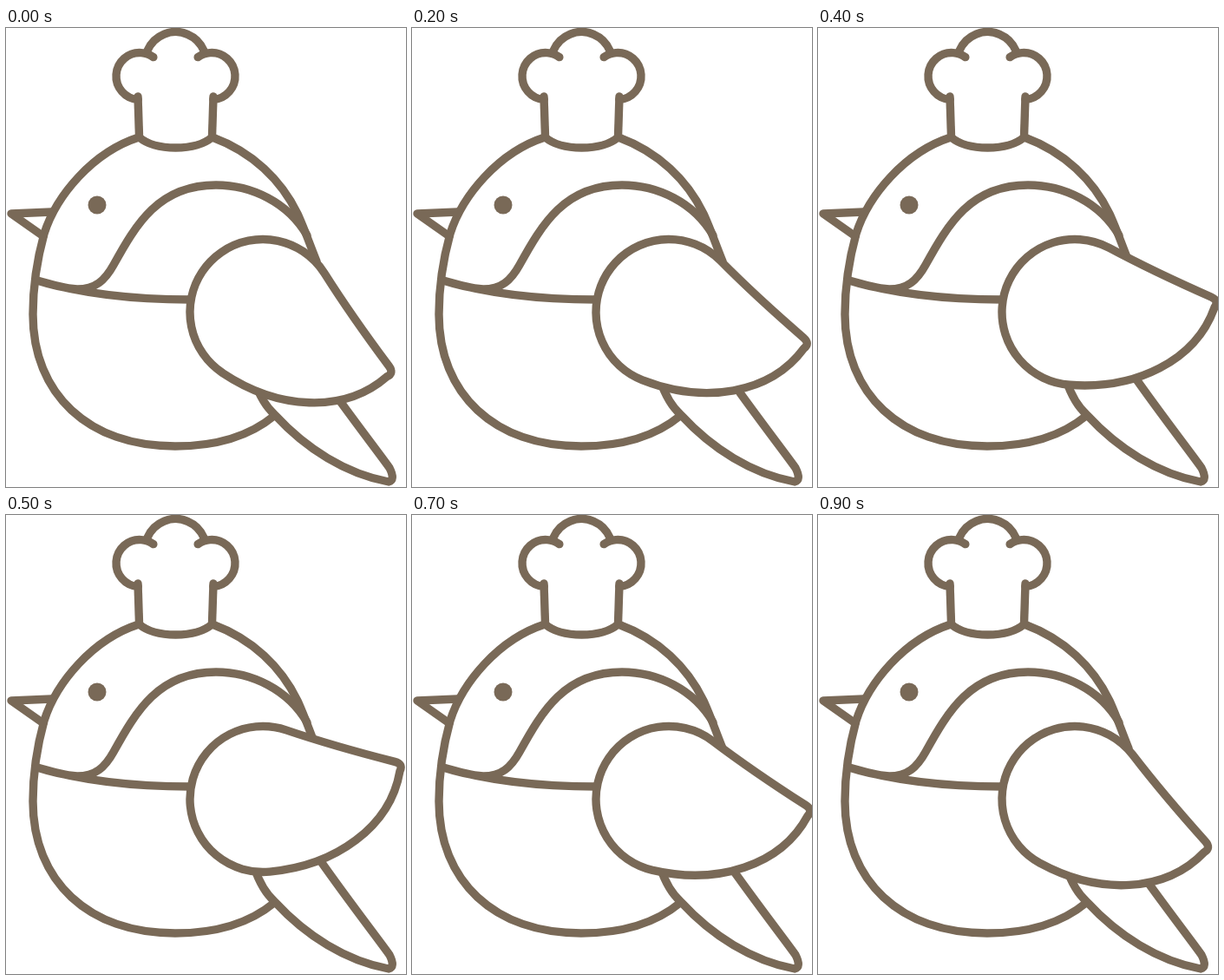
Animation of 461x529 px, one loop 1000 ms. Source, as an HTML page with a canvas:

```html
<!DOCTYPE html>
<html lang="en">
<head>
<meta charset="utf-8">
<title>Chef bird</title>
<style>
  html, body { margin: 0; width: 100%; height: 100%; overflow: hidden; background: #fff; }
  canvas { display: block; }
</style>
</head>
<body>
<canvas id="stage" width="461" height="529"></canvas>
<script>
const ctx = document.getElementById('stage').getContext('2d');
const W = 461, H = 529;
const INK = '#796957', PAPER = '#fff';
const LOOP = 1000, STEP = 100, HALF = 5;
const rad = deg => deg * Math.PI / 180;

const body = new Path2D(
  'M153 126C100 143 58 193 44 237C36 266 31 300 31 330C31 422 95 482 195 482C240 482 280 471 309 447' +
  'M238 126C284 143 317 175 336 214C343 229 350 249 358 269');
const beak = new Path2D('M53 212L6 214L43 240');
const scarf = new Path2D(
  'M36 291C55 297 68 300 82 301C103 301 114 291 124 273C150 226 176 181 242 181C283 181 325 201 347 239' +
  'M36 291C90 307 150 313 212 313');
const tail = new Path2D(
  'M286 406C292 424 300 437 310 446C346 485 392 514 441 523Q449 521 442 507C430 490 395 445 362 398');

// The wing lies around its pivot, with the tip along the x axis.
const PIVOT = { x: 296, y: 327.5 }, RADIUS = 84;
const wing = new Path2D();
wing.arc(0, 0, RADIUS, rad(99), rad(303));
wing.quadraticCurveTo(94, -39, 158, -4);
wing.quadraticCurveTo(167, 1, 161, 8);
wing.bezierCurveTo(134, 68, 62, 95, -13, 83);
wing.closePath();

// Angle of the wing tip in degrees: slow off the low rest, then lifting steadily.
const LOW = 24.6, SWING = 39;
const wingAngle = lift => LOW - SWING * lift ** 1.25;

function drawWing(lift) {
  ctx.save();
  ctx.translate(PIVOT.x, PIVOT.y);
  ctx.rotate(rad(wingAngle(lift)));
  ctx.fillStyle = PAPER;
  ctx.fill(wing);
  ctx.stroke(wing);
  ctx.restore();
}

function strokeArc(x, y, r, from, to) {
  ctx.beginPath();
  ctx.arc(x, y, r, rad(from), rad(to));
  ctx.stroke();
}

function drawHat() {
  ctx.save();
  ctx.translate(195.5, 0);
  strokeArc(0, 39.8, 35.3, 203, 337);
  ctx.stroke(new Path2D('M-42 126C-23 142 23 142 42 126'));
  for (const side of [1, -1]) {
    ctx.scale(side, 1);
    strokeArc(-41.5, 55.5, 27, 94, 306);
    ctx.stroke(new Path2D('M-43.500 79L-42 125'));
  }
  ctx.restore();
}

function drawEye() {
  ctx.fillStyle = INK;
  ctx.beginPath();
  ctx.arc(105, 204, 10.5, 0, Math.PI * 2);
  ctx.fill();
}

function draw(time) {
  const step = Math.floor((time % LOOP) / STEP);
  const lift = 1 - Math.abs(step - HALF) / HALF;

  ctx.fillStyle = PAPER;
  ctx.fillRect(0, 0, W, H);
  ctx.strokeStyle = INK;
  ctx.lineWidth = 9.4;
  ctx.lineCap = ctx.lineJoin = 'round';

  for (const part of [body, beak, scarf, tail]) ctx.stroke(part);
  drawHat();
  drawEye();
  drawWing(lift);
}

const start = performance.now();
function tick() {
  draw(performance.now() - start);
  requestAnimationFrame(tick);
}
tick();
</script>
</body>
</html>
```
